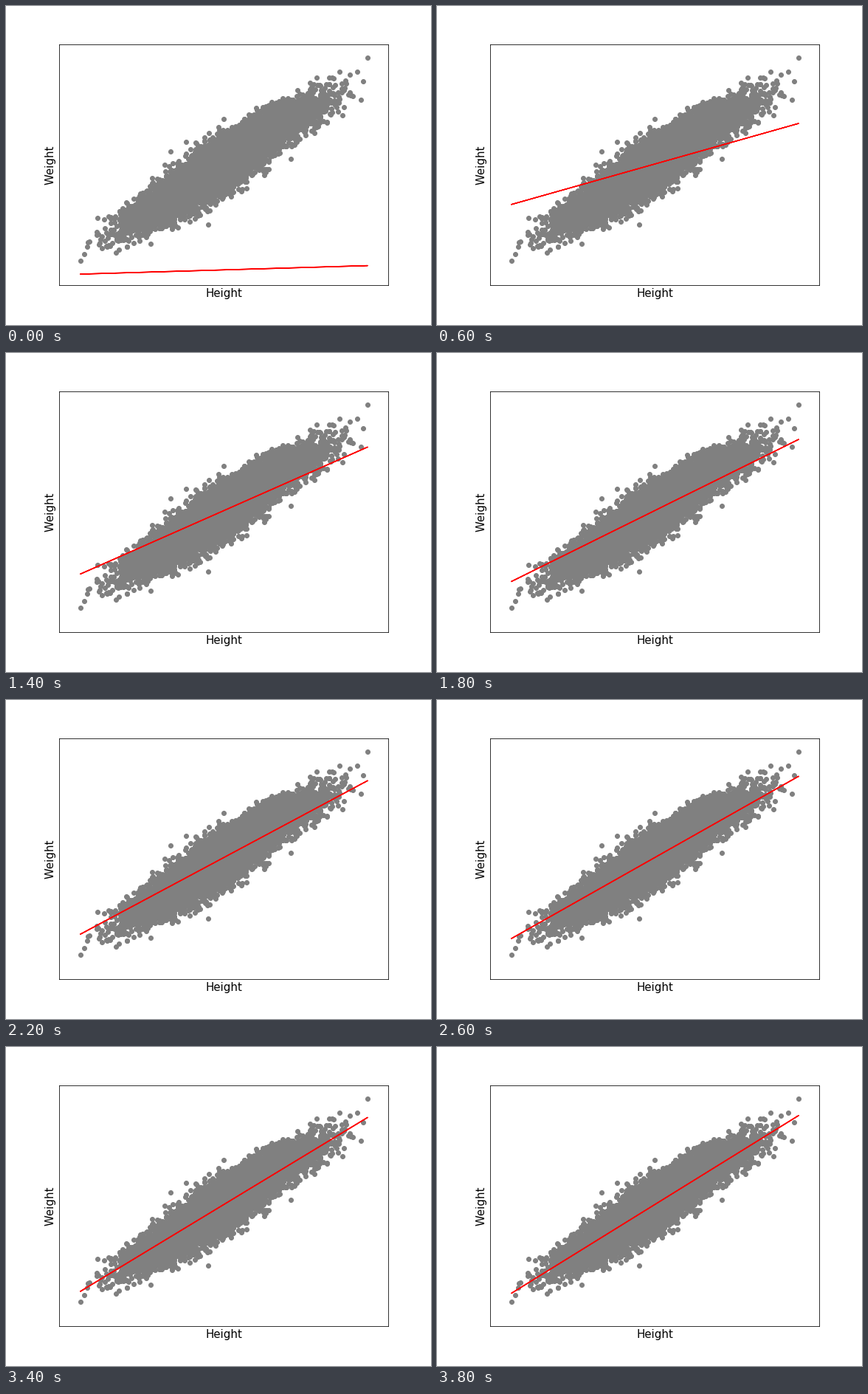
A matplotlib script for the animation above (4 s loop, 576 px wide and 432 px high).

```python
import numpy as np
import matplotlib.pyplot as plt
from matplotlib.animation import FuncAnimation

W, H, DPI = 576, 432, 72
FRAMES, INTERVAL = 20, 200
X0, X1 = 101.1, 490.0

# The most visible stray points, in stage pixels
STRAYS = [(X0, 345), (106, 336), (110, 326), (124, 287), (149, 334), (196, 322),
          (223, 197), (244, 184), (274, 296), (295, 153), (350, 229), (386, 207),
          (421, 97), (438, 97), (452, 89), (456, 148), (466, 93), (476, 89),
          (481, 127), (484, 102), (X1, 70)]


def group(rng, n, mean, sd, corr, reach=3.3):
    """Correlated normal points, cut off at the given number of deviations."""
    u, v = rng.standard_normal((2, n))
    keep = np.hypot(u, v) < reach
    u, v = u[keep], v[keep]
    x = mean[0] + sd[0] * u
    y = mean[1] - sd[1] * (corr * u + np.sqrt(1 - corr ** 2) * v)
    return np.c_[x, y]


def cloud(seed=4):
    rng = np.random.default_rng(seed)
    return np.vstack([group(rng, 5000, (249.6, 249.6), (42.5, 25.5), 0.85),
                      group(rng, 5000, (333.3, 181.1), (45.0, 26.5), 0.863),
                      STRAYS])


def ends(i):
    """Heights of the line's two ends after i steps of the fit."""
    if i == 0:
        return 363.1, 351.6
    mid = 213.1 + 1.6 * 0.7 ** (i - 1)
    half = (257 - 193.8 * 0.872 ** (i - 1)) / 2
    return mid + half, mid - half


plt.rcParams["text.kerning_factor"] = 6
fig = plt.figure(figsize=(W / DPI, H / DPI), dpi=DPI, facecolor="white")
fig.subplots_adjust(left=0.125, right=0.9, bottom=0.125, top=0.88)
ax = fig.add_subplot()
ax.set(xlim=(0.125 * W, 0.9 * W), ylim=(0.875 * H, 0.12 * H), xticks=[], yticks=[])
ax.set_xlabel("Height", fontsize=15)
ax.set_ylabel("Weight", fontsize=15)

ax.scatter(*cloud().T, color="gray")
line, = ax.plot([], [], color="red")


def draw(i):
    # There and back, so the stroke overlaps itself and its edges firm up
    left, right = ends(i)
    line.set_data([X0, X1, X0], [left, right, left])
    return line,


anim = FuncAnimation(fig, draw, frames=FRAMES, interval=INTERVAL,
                     repeat=True, repeat_delay=0)
plt.show()
```
